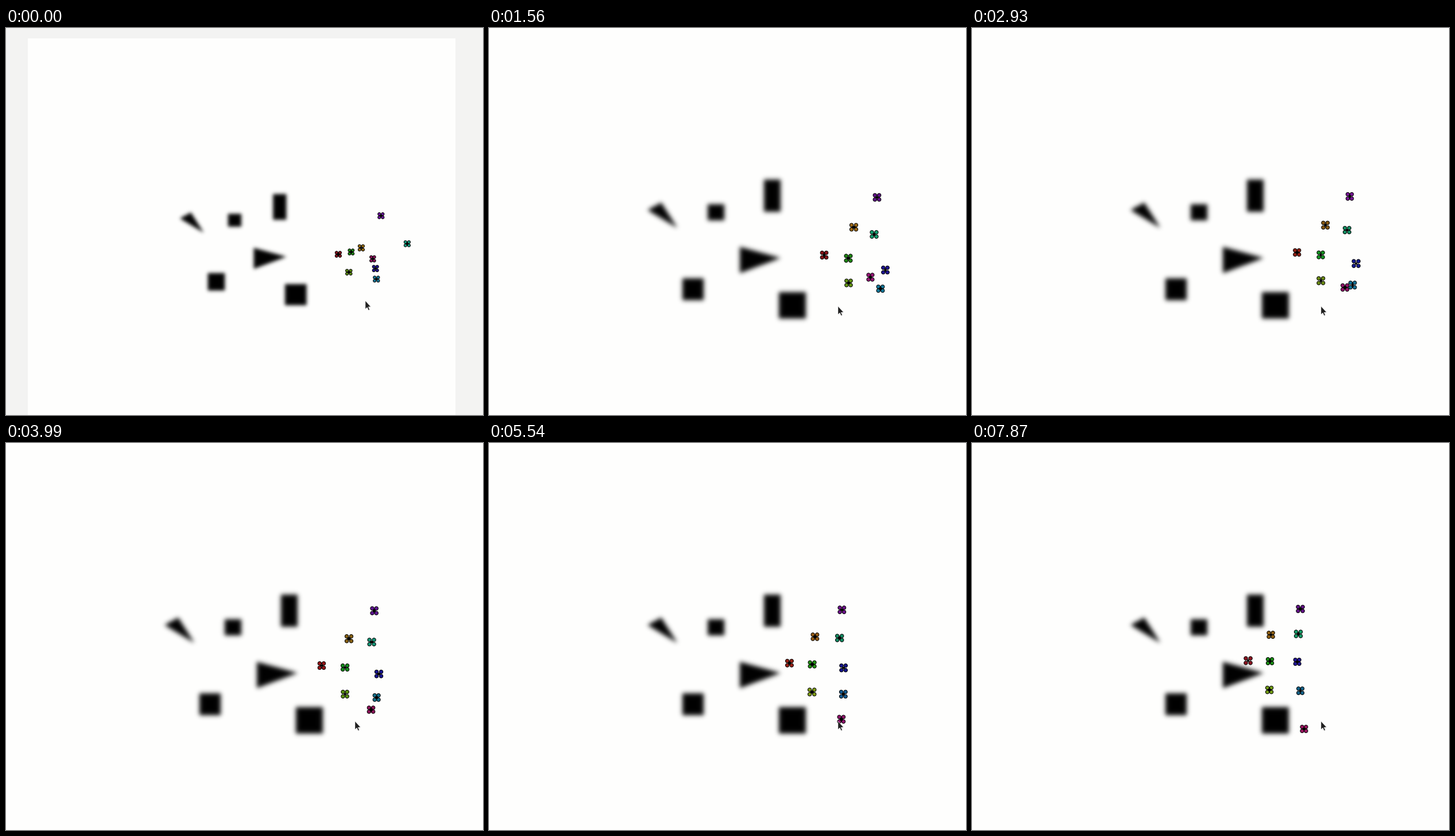
Animation of 831 by 674 pixels, one loop 8000 ms. Source, as a matplotlib script:

```python
import colorsys

import matplotlib.pyplot as plt
import numpy as np
from matplotlib.animation import FuncAnimation
from matplotlib.collections import PolyCollection
from matplotlib.patches import Polygon, Rectangle

W, H, DPI = 831, 674, 100
FRAMES, INTERVAL = 200, 40
PX = 72 / DPI
MARGIN, PAGE = "#f3f3f2", "#fefefd"
CENTER = np.array([410.5, 390.5])
PAGE_HALF = 466
START_ZOOM, ZOOM_FROM, ZOOM_TO = 0.8, 0.05, 0.75
TURN, END = 1.56, 7.87

# Each bug flies from a start by a turning point to its end, in full-zoom pixels.
BUGS = np.array([
    [(621, 395), (584, 395.5), (480.5, 379)],
    [(671, 381), (635.5, 347), (520, 334)],
    [(644, 434), (626.5, 444), (517.5, 430)],
    [(649, 390), (626, 401), (518.5, 380)],
    [(771, 372), (671, 359.5), (568, 332.5)],
    [(704, 449), (682, 454), (571.5, 431.5)],
    [(702, 426), (690.5, 421.5), (566, 381)],
    [(714, 311), (676, 295), (571.5, 289)],
    [(696, 405), (664.5, 434), (578, 498)],
])


def box(cx, cy, w, h):
    x, y = w / 2, h / 2
    return [(cx - x, cy - y), (cx + x, cy - y), (cx + x, cy + y), (cx - x, cy + y)]


OBSTACLES = [
    box(355.5, 455, 37, 37),
    box(528.5, 483, 46, 46),
    box(395.5, 321, 28, 28),
    box(493.5, 292, 28, 56),
    [(437, 381), (508, 400.5), (437, 427)],
    [(276, 317), (300, 304), (328, 348)],
]
FIELD = (250, 240, 580, 540)
ARROW = 1.12 * np.array([(0, 0), (0, 13), (2.9, 10.3), (4.8, 14.8), (6.7, 14),
                         (4.8, 9.6), (8.6, 9.4)])


def inside(points, x, y):
    mask = np.ones_like(x, bool)
    for (x0, y0), (x1, y1) in zip(points, points[1:] + points[:1]):
        mask &= (x1 - x0) * (y - y0) - (y1 - y0) * (x - x0) >= 0
    return mask


def blurred_field(sigma=4.1):
    left, top, right, bottom = FIELD
    x, y = np.meshgrid(np.arange(left, right) + 0.5, np.arange(top, bottom) + 0.5)
    alpha = np.zeros_like(x)
    for points in OBSTACLES:
        alpha[inside(points, x, y)] = 1
    k = np.exp(-0.5 * (np.arange(-13, 14) / sigma) ** 2)
    k /= k.sum()
    for axis in (0, 1):
        alpha = np.apply_along_axis(np.convolve, axis, alpha, k, "same")
    return np.dstack([np.zeros(alpha.shape + (3,)), alpha])


def bug_positions(t):
    start, turn, end = BUGS.swapaxes(0, 1)
    if t < TURN:
        u = t / TURN
        return start + (turn - start) * u * (1.35 - 0.35 * u)
    u = min((t - TURN) / (END - TURN), 1)
    # Sideways drift gathers speed while the vertical spread settles.
    progress = np.array([u ** 1.15, 1 - (1 - u) ** 1.35])
    return turn + (end - turn) * progress


def ellipse(center, rx, ry):
    a = np.linspace(0, 2 * np.pi, 18, endpoint=False)
    return np.asarray(center) + np.column_stack([rx * np.cos(a), ry * np.sin(a)])


fig = plt.figure(figsize=(W / DPI, H / DPI), dpi=DPI, facecolor=MARGIN)
ax = fig.add_axes([0, 0, 1, 1])
page = ax.add_patch(Rectangle((0, 0), 1, 1, color=PAGE, lw=0))
field = ax.imshow(blurred_field(), interpolation="bilinear", aspect="auto", zorder=2)
petals = ax.add_collection(PolyCollection([], edgecolors="black", linewidths=PX, zorder=3))
bodies = ax.add_collection(PolyCollection([], facecolors="black", linewidths=0, zorder=4))
cursor = ax.add_patch(Polygon(ARROW, fc="#202020", ec="white", lw=0.5 * PX, zorder=5))
ax.set_xlim(0, W)
ax.set_ylim(H, 0)
ax.axis("off")


def draw(frame):
    t = frame * INTERVAL / 1000
    u = np.clip((t - ZOOM_FROM) / (ZOOM_TO - ZOOM_FROM), 0, 1)
    ease = u * u * (3 - 2 * u)
    zoom = START_ZOOM + (1 - START_ZOOM) * ease

    def place(point):
        return CENTER + zoom * (np.asarray(point) - CENTER)

    page.set_xy(place(CENTER - PAGE_HALF))
    page.set_width(2 * PAGE_HALF * zoom)
    page.set_height(2 * PAGE_HALF * zoom)
    (left, top), (right, bottom) = place(FIELD[:2]), place(FIELD[2:])
    field.set_extent((left, right, bottom, top))

    rng = np.random.default_rng(frame // 2)
    wings, colors, cores = [], [], []
    for i, pos in enumerate(bug_positions(t)):
        center = place(pos)
        dx, dy = zoom * rng.uniform(3.3, 4.1, 2)
        hue = (i / len(BUGS) + rng.uniform(-0.02, 0.02)) % 1
        color = colorsys.hsv_to_rgb(hue, 0.86, rng.uniform(0.52, 0.62))
        for sx in (-1, 1):
            for sy in (-1, 1):
                wings.append(ellipse(center + (sx * dx, sy * dy), 3.2 * zoom, 3.2 * zoom))
                colors.append(color)
        cores.append(ellipse(center, *(zoom * rng.uniform(1.8, 3.4, 2))))
    petals.set_verts(wings)
    petals.set_facecolor(colors)
    bodies.set_verts(cores)

    cursor.set_xy(ARROW + (626 - 18 * ease, 475 + 9.5 * ease))
    return page, field, petals, bodies, cursor


animation = FuncAnimation(fig, draw, frames=FRAMES, interval=INTERVAL,
                          repeat=True, repeat_delay=0)
plt.show()
```
